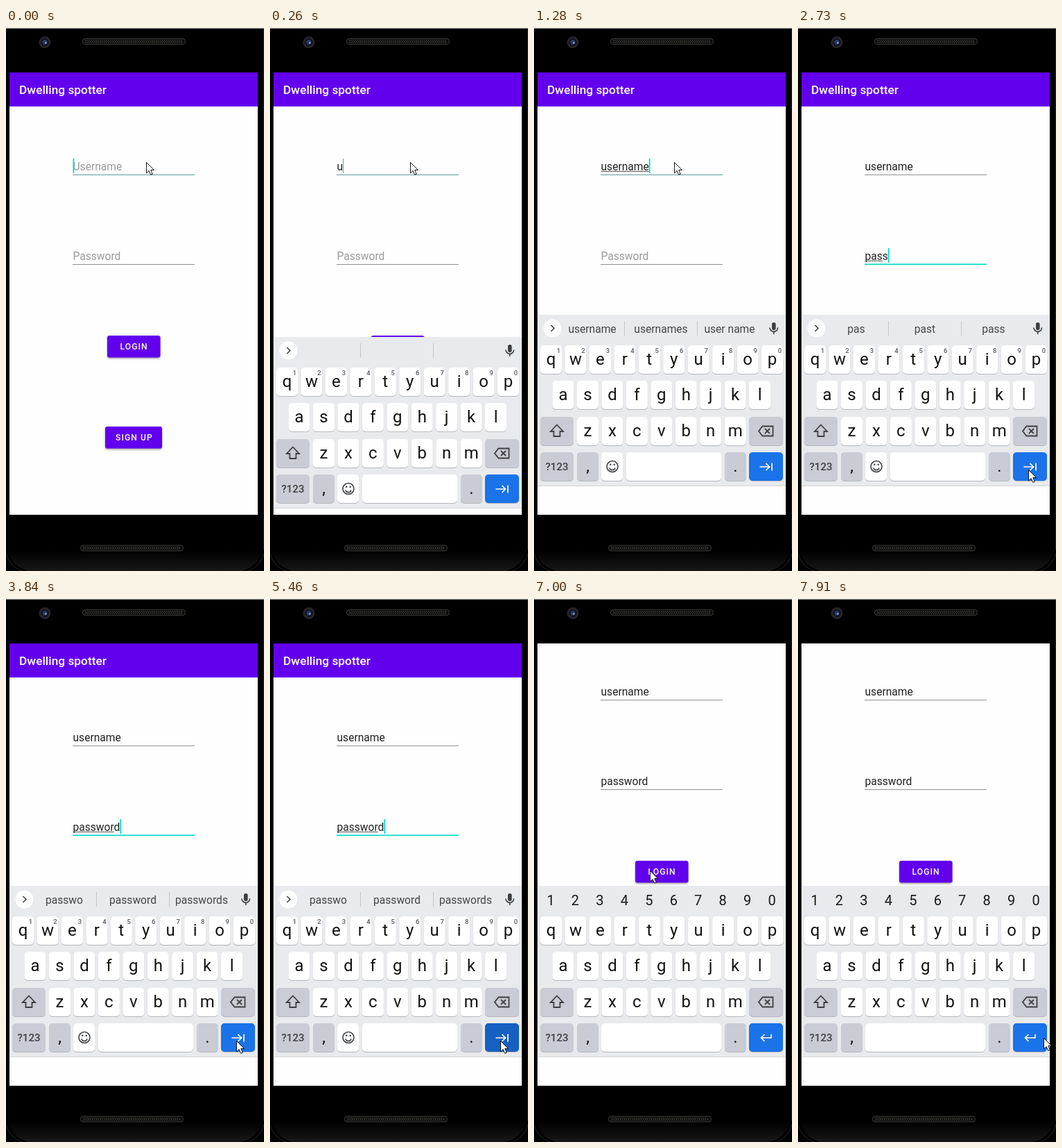
An HTML page with a canvas for the animation above (8000 ms loop, 372 by 782 pixels).

```html
<!DOCTYPE html>
<html lang="en">
<head>
<meta charset="utf-8">
<title>Login screen</title>
<style>
html, body { margin: 0; width: 372px; height: 782px; overflow: hidden; background: #000; }
canvas { display: block; }
</style>
</head>
<body>
<canvas id="stage" width="372" height="782"></canvas>
<script>
const ctx = document.getElementById('stage').getContext('2d');
const LOOP = 8000, PITCH = 35.45, PURPLE = '#6200ee', TEAL = '#03dac5';

// Step tables: [start time, value...]
const pointer = [
  [0, 202, 193], [1660, 356, 620], [1780, 332, 636], [5580, 358, 652], [5730, 345, 768],
  [5880, 95, 440], [6000, 188, 393], [6120, 133, 348], [6270, 145, 366], [6390, 158, 381],
  [6510, 167, 391], [7120, 150, 398], [7240, 100, 430], [7370, 43, 468], [7490, 55, 478],
  [7640, 360, 600], [7760, 356, 631], [7910, 354, 632]
];
const userTyping = [
  [0, 0], [260, 1], [380, 2], [540, 3], [800, 4], [920, 5], [1040, 6], [1160, 7], [1280, 8]
];
const passTyping = [
  [0, 0], [2350, 1], [2480, 2], [2600, 3], [2730, 4], [2850, 5], [2970, 6], [3090, 7], [3210, 8]
];
const suggestions = [
  [0], [380, 'u', 'I', "I'm"], [540, 'use', 'us', 'uses'], [800, 'use', 'user', 'used'],
  [920, 'user', 'users', 'used'], [1040, 'usern', 'username', 'users'],
  [1160, 'userna', 'username', 'usernames'], [1280, 'username', 'usernames', 'user name'],
  [1780], [2350, 'p', 'I', 'o'], [2480, 'p', 'o', 'pm'], [2600, 'pa', 'pay', 'part'],
  [2730, 'pas', 'past', 'pass'], [2850, 'pass', 'passed', 'past'],
  [2970, 'passw', 'password', 'passwords'], [3090, 'passwo', 'password', 'passwords']
];
const at = (table, t) => table.filter(row => row[0] <= t).pop().slice(1);
const within = (t, a, b) => t >= a && t < b;

function rect(x, y, w, h, color) {
  ctx.fillStyle = color;
  ctx.fillRect(x, y, w, h);
}

function box(x, y, w, h, r, color) {
  ctx.fillStyle = color;
  ctx.beginPath();
  ctx.roundRect(x, y, w, h, r);
  ctx.fill();
}

function text(str, x, y, size, color, align = 'left', weight = 400, spacing = 0) {
  ctx.font = `${weight} ${size}px Roboto, sans-serif`;
  ctx.letterSpacing = spacing + 'px';
  ctx.textAlign = align;
  ctx.fillStyle = color;
  ctx.fillText(str, x, y);
}

function icon(path, color, width = 1.8, fill) {
  const shape = new Path2D(path);
  if (fill) {
    ctx.fillStyle = fill;
    ctx.fill(shape);
  }
  ctx.strokeStyle = color;
  ctx.lineWidth = width;
  ctx.stroke(shape);
}

function speaker(x, y) {
  box(x, y, 149, 9, 4.5, '#3b3a37');
  box(x + 1, y + 1, 147, 7, 3.5, '#0b0b0b');
  for (let i = 4; i < 145; i += 3) {
    icon(`M${x + i} ${y + 2} l2 2.5 l-2 2.5`, '#5a5853', 0.8);
  }
}

function phone() {
  rect(0, 0, 372, 782, '#000');
  const shade = ctx.createLinearGradient(0, 752, 0, 782);
  shade.addColorStop(0, '#000');
  shade.addColorStop(1, '#181818');
  ctx.fillStyle = shade;
  ctx.fill(new Path2D('M2 745 Q6 775 32 782 H340 Q366 775 370 745 Z'));
  icon('M0 756 Q5 777 24 782 M372 756 Q367 777 348 782', '#1c1c1c', 1.2);
  rect(0, 0, 372, 1, '#8c8c8c');
  rect(371, 1, 1, 750, '#242424');
  speaker(110, 15);
  speaker(107, 744.5);
  for (const [r, color] of [[8.5, '#25252a'], [5.5, '#11131f'], [3.5, '#2c3568']]) {
    box(56 - r, 20.5 - r, 2 * r, 2 * r, r, color);
  }
  box(56, 20, 2.5, 2.5, 1.2, '#9aa8dc');
}

function field(y, hint, word, count, state) {
  const typed = word.slice(0, count);
  text(typed || hint, 96.5, y + 5.5, 15.6, typed ? '#202020' : '#9a9a9a');
  const width = ctx.measureText(typed).width;
  const strong = state === 'strong';
  rect(96, y + (strong ? 11.5 : 12), 176, strong ? 1.7 : 1,
    strong ? TEAL : state ? '#5d9b96' : '#929292');
  if (!state) return;
  const lag = count === 8 && !strong ? 8 : Math.max(0, count - 1);
  rect(96.5, y + 7, ctx.measureText(word.slice(0, lag)).width, 1, '#555');
  const bright = strong || !count || count === 8;
  rect(96.5 + width, y - 11, bright ? 1.8 : 1, 21, bright ? TEAL : '#5d9b96');
}

function button(x, y, w, label, color) {
  ctx.save();
  ctx.shadowColor = 'rgba(0,0,0,.4)';
  ctx.shadowBlur = 3;
  ctx.shadowOffsetY = 1.5;
  box(x, y, w, 31.5, 3, color);
  ctx.restore();
  text(label, x + (w > 80 ? 15 : 18.5), y + 20.3, 12.1, '#fff', 'left', 500, 1.1);
}

function key(x, y, w, color, label, size = 24) {
  box(x, y + 1, w, 41, 5, '#b3b6bb');
  box(x, y, w, 41, 5, color);
  if (label) text(label, x + w / 2, y + 28, size, '#111', 'center');
}

function keyboard(t) {
  const numbers = t >= 5730, gray = '#c9ccd4', ink = '#3c4043';
  rect(5, 413, 358, 247, '#e8eaed');
  rect(5, 659, 358, 1, '#d5d7da');

  if (!numbers) {
    box(13.5, 419.5, 26, 26, 13, '#fff');
    const words = at(suggestions, t);
    icon(within(t, 1780, 2230) ? 'M28.5 428 l-4.5 4.5 l4.5 4.5' : 'M24.5 428 l4.5 4.5 l-4.5 4.5', ink, 1.6);
    if (!within(t, 1780, 2230)) {
      rect(130, 422, 1, 21, '#c4c7cb');
      rect(235, 422, 1, 21, '#c4c7cb');
    }
    words.forEach((word, i) => text(word, 84 + 99 * i, 438.5, 15.6, '#44474b', 'center'));
    box(343, 424, 5.6, 11, 2.8, ink);
    icon('M340 431.5 a5.8 5.8 0 0 0 11.6 0 M345.8 437.5 v3.5', ink, 1.6);
  }

  [['qwertyuiop', 9, 457], ['asdfghjkl', 26.5, 508], ['zxcvbnm', 62, 560]].forEach(([row, x, y]) => {
    [...row].forEach((letter, i) => key(x + i * PITCH, y, 31, '#fff', letter));
  });
  [...'1234567890'].forEach((digit, i) => {
    if (numbers) text(digit, 24 + i * PITCH, 440.5, 20, '#17181a', 'center');
    else text(digit, 35.5 + i * PITCH, 467.5, 9.5, '#55585c', 'center', 500);
  });

  key(9, 560, 48, gray);
  key(310, 560, 49, gray);
  icon('M33 571.5 l9 9.5 h-4.5 v7 h-9 v-7 h-4.5 z', ink);
  icon('M329.5 573.5 h15 v14 h-15 l-5.5 -7 z M333 577 l7 7 m0 -7 l-7 7', ink);

  key(9, 611, 48, gray);
  text('?123', 33, 637, 15, ink, 'center', 500);
  key(62, 611, 31, gray, ',');
  key(275, 611, 31, gray, '.');
  if (numbers) {
    key(97, 611, 173, '#fff');
  } else {
    key(97, 611, 31, '#fff');
    key(133, 611, 137, '#fff');
    icon('M121 631.5 a8 8 0 1 0 -16 0 a8 8 0 1 0 16 0 M108.8 633.5 a4.4 4.4 0 0 0 8.4 0', ink, 1.6);
    box(109, 627.5, 2.5, 2.5, 1.3, ink);
    box(114.5, 627.5, 2.5, 2.5, 1.3, ink);
  }
  const pressed = within(t, 3710, 3840) || within(t, 5460, 5580);
  key(310, 611, 49, pressed ? '#1660c2' : '#1a73e8');
  icon(numbers
    ? 'M342 627 v5 h-14.5 m5 -5 l-5 5 l5 5'
    : 'M325.5 632 h14 m-5 -5 l5 5 l-5 5 M343 626.5 v11', '#fff', 1.7);
}

function draw(t) {
  const scrolled = t >= 5580, onPassword = within(t, 1780, 5580);
  phone();
  ctx.save();
  ctx.beginPath();
  ctx.rect(5, 64, 358, 637);
  ctx.clip();
  rect(5, 64, 358, 637, '#fefefe');

  ctx.save();
  if (scrolled) ctx.translate(0, -66);
  rect(5, 64, 358, 49, PURPLE);
  text('Dwelling spotter', 19, 95, 17.3, '#fff', 'left', 500);
  field(199, 'Username', 'username', at(userTyping, t)[0], t < 1780 && 'soft');
  field(328, 'Password', 'password', at(passTyping, t)[0], onPassword && 'strong');
  const tapped = within(t, 6000, 6120) || within(t, 6880, 7000);
  button(146, 443, 76.5, 'LOGIN', tapped ? '#8a3df2' : PURPLE);
  button(143, 574, 82, 'SIGN UP', PURPLE);
  ctx.restore();

  if (t >= 260) {
    ctx.save();
    if (t < 380) ctx.translate(0, 32);
    keyboard(t);
    ctx.restore();
  }
  ctx.restore();

  const [x, y] = at(pointer, t);
  icon(`M${x + 0.5} ${y + 0.5} v15.5 l3.6 -3.4 l2.6 5.8 l2.6 -1.1 l-2.6 -5.7 h4.8 z`, '#111', 1, '#fff');
}

function tick(now) {
  draw(now % LOOP);
  requestAnimationFrame(tick);
}
requestAnimationFrame(tick);
</script>
</body>
</html>
```
